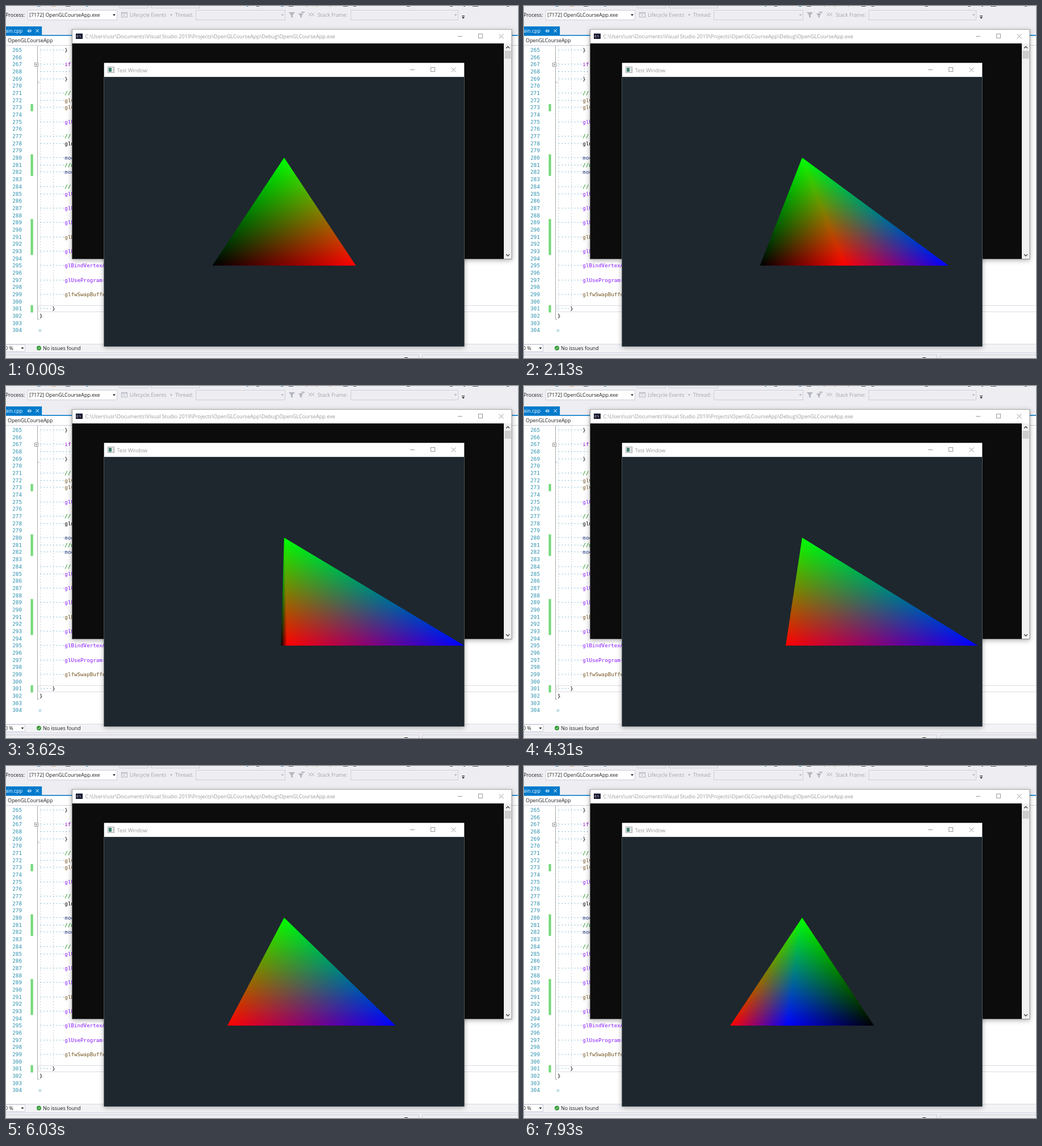
An HTML page with a canvas that plays this animation: 902x621 px, repeating every 8000 ms.

```html
<!DOCTYPE html>
<html lang="en">
<head>
<meta charset="utf-8">
<title>Rotating pyramid</title>
<style>
  html, body { margin: 0; width: 100%; height: 100%; overflow: hidden; background: #eeeef2; }
  svg, canvas { position: absolute; display: block; }
  svg { left: 0; top: 0; }
  canvas { left: 173px; top: 125px; }
  text { white-space: pre; }
  .ui { font: 8.9px "Open Sans", "Noto Sans", sans-serif; fill: #1e1e1e; }
  .ui .dim { fill: #a2a4a8; }
  .ui .title { font-size: 9.1px; fill: #999; }
  .code { font: 9.21px "DejaVu Sans Mono", "Liberation Mono", monospace; }
  .thin { fill: none; stroke: #999; stroke-width: 1; }
</style>
</head>
<body>
<svg width="902" height="621" viewBox="0 0 902 621">
  <defs>
    <filter id="shadow" x="-5%" y="-5%" width="110%" height="112%">
      <feDropShadow dx="0" dy="2" stdDeviation="4" flood-color="#000" flood-opacity=".32"/>
    </filter>
    <g id="buttons" class="thin">
      <path d="M0 4.5H8M72.5 .5l8 8M80.5 .5l-8 8"/>
      <rect x="36.5" y=".5" width="7" height="7"/>
    </g>
  </defs>

  <!-- toolbar -->
  <rect width="902" height="621" fill="#eeeef2"/>
  <g fill="none" stroke="#cccedb">
    <path d="M199.5 0V3.5H249.5V0M255.5 0V3.5H341.5V0"/>
    <rect x="38.5" y="7.5" width="157" height="17" fill="#fff"/>
    <rect x="334.5" y="7.5" width="157" height="17"/>
    <rect x="607.5" y="7.5" width="189" height="17"/>
  </g>
  <path d="M55 0h6M141 0h4M424 0h3M484 0h5" stroke="#3b8fc6" stroke-width="2"/>
  <path d="M80 0h8M528 0h3M546 0h3M570 0h3" stroke="#d9b48a" stroke-width="2"/>
  <path d="M105 0h8M441 0h5M498 0h8M594 0h8M612 0h5M706 0h6M782 0h5M806 0h3M822 0h10M882 0h4" stroke="#555a66" stroke-width="2"/>
  <path d="M188 14.5h5l-2.5 3zM803 19.5h5l-2.5 3zM803 17h5v1h-5z" fill="#1e1e1e"/>
  <path d="M288.5 14.5h5l-2.5 3zM484.5 14.5h5l-2.5 3zM789.5 14.5h5l-2.5 3z" fill="#b4b6bf"/>
  <g fill="none" stroke="#b4b6bf">
    <rect x="203.5" y="11.5" width="10" height="8"/>
    <path d="M204 13h10M206 16h4"/>
    <path d="M533 12l5 6M538 12l-5 6M538 12l5 6M543 12l-5 6"/>
  </g>
  <path d="M498 11h11l-4 5v5l-3-2v-3zM515 13h9l-3 4v4l-3-2v-2zM520 10h6v2h-6z" fill="#b4b6bf"/>
  <g class="ui">
    <text x="-1" y="19">Process:</text>
    <text x="41" y="19">[7172] OpenGLCourseApp.exe</text>
    <text class="dim" x="218" y="19">Lifecycle Events</text>
    <text class="dim" x="298" y="19">Thread:</text>
    <text class="dim" x="549" y="19">Stack Frame:</text>
  </g>

  <!-- editor -->
  <rect y="52" width="902" height="545" fill="#fff"/>
  <rect y="36" width="63.2" height="15.5" fill="#007acc"/>
  <rect y="51" width="902" height="1.6" fill="#007acc"/>
  <path d="M0 69.5H902" stroke="#cccedb"/>
  <path d="M37 44h3M40 41.5v5M40 42.5h4v3h-4M52.5 41l5.5 5.5M58 41l-5.5 5.5" fill="none" stroke="#fff"/>
  <g class="ui">
    <text x="-1" y="47" style="fill:#fff">ain.cpp</text>
    <text x="3" y="64">OpenGLCourseApp</text>
  </g>
  <path d="M57.5 528.5H902M57.5 539.5H902M57.5 528v11" stroke="#dcdce4"/>
  <path d="M55.5 70v483M55.5 134.5h3M55.5 552.5h3" stroke="#a5a5a5" fill="none"/>
  <path d="M60.5 70V540M83.5 70V527M106.5 110V122" stroke="#c9cdd8" stroke-dasharray="2 3"/>
  <rect x="50.5" y="100.5" width="6" height="6" fill="#fff" stroke="#999"/>
  <path d="M52 103.5h3" stroke="#555"/>
  <g id="marks" fill="#74d879"></g>
  <g id="code" class="code"></g>
  <rect x="58.5" y="571" width="3" height="3" fill="none" stroke="#7fb9d0" stroke-width=".8"/>

  <!-- status strip -->
  <rect y="597" width="902" height="14" fill="#f3f3f6"/>
  <path d="M0 596.5H902M0 611.5H902" stroke="#d5d7e2"/>
  <path d="M0 615.5H727.5V621M733.5 621V615.5H902" fill="none" stroke="#cccedb"/>
  <path d="M0 597.5H33.5V609.5H0" fill="#fff" stroke="#cccedb"/>
  <path d="M26.5 602.5h5l-2.5 3zM702 620h6v1h-6z" fill="#1e1e1e"/>
  <circle cx="58" cy="603.5" r="4" fill="#339933"/>
  <path d="M56 603.5l1.5 1.5 2.7-3" fill="none" stroke="#fff"/>
  <g class="ui">
    <text x="-2" y="607">0 %</text>
    <text x="65" y="607">No issues found</text>
  </g>

  <!-- console -->
  <rect x="116" y="41" width="775.4" height="405.8" fill="#777" filter="url(#shadow)"/>
  <rect x="116.8" y="41.6" width="773.8" height="24.4" fill="#fff"/>
  <rect x="116.8" y="66" width="760.2" height="380" fill="#0c0c0c"/>
  <rect x="877" y="66" width="13.6" height="380" fill="#f0f0f0"/>
  <rect x="878.5" y="79" width="11" height="14" fill="#cdcdcd"/>
  <path d="M881 74.5l3-3 3 3M881 438l3 3 3-3" fill="none" stroke="#444" stroke-width="1.4"/>
  <rect x="123" y="48" width="12" height="10" fill="#15152c"/>
  <path d="M123 48.5h12" stroke="#9aa5c0"/>
  <path d="M127 52h-2v3h2M128.5 52v1M128.5 54v1M130 51.5l2 4" fill="none" stroke="#ddd" stroke-width=".8"/>
  <use href="#buttons" x="796" y="49"/>
  <g class="ui"><text class="title" x="139.5" y="57">C:\Users\usr\Documents\Visual Studio 2019\Projects\OpenGLCourseApp\Debug\OpenGLCourseApp.exe</text></g>

  <!-- test window -->
  <rect x="172.2" y="100.4" width="635.6" height="500.6" fill="#596066" filter="url(#shadow)"/>
  <rect x="173" y="100.4" width="634" height="25" fill="#fff"/>
  <rect x="173" y="125.2" width="634" height="475" fill="#1e272e"/>
  <rect x="179.5" y="107.5" width="11" height="10" fill="#f4f4f4" stroke="#a0a4aa"/>
  <rect x="181" y="109" width="5" height="7" fill="#43836f"/>
  <path d="M187 110h3M187 112.5h3M187 115h3" stroke="#bbb"/>
  <use href="#buttons" x="712" y="108"/>
  <g class="ui"><text class="title" x="195.5" y="116.5">Test Window</text></g>
</svg>
<canvas id="scene" width="634" height="475"></canvas>

<script>
const LOOP = 8000;
const FIRST_LINE = 265, LINE_HEIGHT = 12.68, COLUMN = 5.546, CODE_LEFT = 59;
const lineY = n => 77.5 + (n - FIRST_LINE) * LINE_HEIGHT;

function add(parent, tag, attrs, text = '') {
  const el = document.createElementNS('http://www.w3.org/2000/svg', tag);
  for (const key in attrs) el.setAttribute(key, attrs[key]);
  el.textContent = text;
  parent.appendChild(el);
}

// Line number: [indent, text, colour]
const MACRO = '#8a1bff', CALL = '#74531f', NOTE = '#008000', LOCAL = '#1f377f', PLAIN = '#000';
const source = {
  265: [8, '}', PLAIN], 267: [8, 'if', '#8f08c4'], 268: [12, '', PLAIN], 269: [8, '}', PLAIN],
  271: [8, '// ', NOTE], 272: [8, 'glC', CALL], 273: [8, 'glC', CALL], 275: [8, 'glU', MACRO],
  277: [8, '// ', NOTE], 278: [8, 'glm', PLAIN], 280: [8, 'mod', LOCAL], 281: [8, '//m', NOTE],
  282: [8, 'mod', LOCAL], 284: [8, '// ', NOTE], 285: [8, 'glU', MACRO], 287: [8, 'glU', MACRO],
  289: [8, 'glB', MACRO], 291: [8, 'glD', CALL], 293: [8, 'glB', MACRO],
  295: [8, 'glBindVertexArray', MACRO], 297: [8, 'glUseProgram(', MACRO],
  299: [8, 'glfwSwapBuffers', CALL], 301: [4, '}', PLAIN], 302: [0, '}', PLAIN]
};

const code = document.getElementById('code');
for (let n = FIRST_LINE; n <= 304; n++) {
  const y = lineY(n) + 3.4;
  add(code, 'text', { x: 11.3, y, fill: '#2b91af' }, n);
  if (!source[n]) continue;
  const [indent, text, fill] = source[n];
  add(code, 'text', { x: CODE_LEFT, y, fill: '#62a9c4' }, '·'.repeat(indent));
  add(code, 'text', { x: CODE_LEFT + indent * COLUMN, y, fill }, text);
}
for (const [from, to] of [[273, 273], [280, 282], [289, 293], [301, 301]]) {
  add(document.getElementById('marks'), 'rect',
    { x: 43.5, y: lineY(from) - 6, width: 4.2, height: (to - from + 1) * LINE_HEIGHT });
}

// Runs of evenly spaced steps: [start, end, steps]
const runs = [
  [0, 0, 1], [70, 820, 11], [890, 1660, 11], [1740, 2530, 11], [2610, 3380, 11], [3460, 4230, 11],
  [4310, 5100, 11], [5190, 5950, 11], [6030, 6830, 11], [6910, 7700, 11], [7780, 7930, 3]
];
function heldTime(t) {
  const [start, end, steps] = runs.filter(run => run[0] <= t).pop();
  if (steps === 1) return start;
  const step = (end - start) / (steps - 1);
  return Math.min(end, start + Math.floor((t - start + 10) / step) * step);
}

const ctx = document.getElementById('scene').getContext('2d');
const CENTRE = 317, APEX = 142.5, HEIGHT = 190;
const base = [
  { x: -0.4, z: 0, rgb: [0, 0, 0] },
  { x: 0, z: 1, rgb: [0, 0, 255] },
  { x: 0.4, z: 0, rgb: [255, 0, 0] }
];

function draw(t) {
  const angle = (6.2 + 0.0225 * heldTime(t)) * Math.PI / 180;
  const sin = Math.sin(angle), cos = Math.cos(angle);
  const [left, middle, right] = base
    .map(({ x, z, rgb }) => ({ x: (x * cos + z * sin) * CENTRE, z: z * cos - x * sin, rgb }))
    .sort((a, b) => a.x - b.x);
  const split = (middle.x - left.x) / (right.x - left.x);
  const nearer = middle.z < left.z + (right.z - left.z) * split;

  ctx.clearRect(0, 0, 634, 475);
  // Each row is the base seen from the front, shrunk and mixed with the green apex.
  for (let y = 143; y <= 332; y++) {
    const k = (y + 0.5 - APEX) / HEIGHT;
    const x0 = CENTRE + left.x * k, x1 = CENTRE + right.x * k;
    const shade = ([r, g, b]) => `rgb(${r * k},${g * k + 255 * (1 - k)},${b * k})`;
    const row = ctx.createLinearGradient(x0, 0, x1, 0);
    row.addColorStop(0, shade(left.rgb));
    if (nearer) row.addColorStop(split, shade(middle.rgb));
    row.addColorStop(1, shade(right.rgb));
    ctx.fillStyle = row;
    ctx.fillRect(x0, y, x1 - x0, 1);
  }
}

const began = performance.now();
function tick() {
  draw((performance.now() - began) % LOOP);
  requestAnimationFrame(tick);
}
tick();
</script>
</body>
</html>
```
